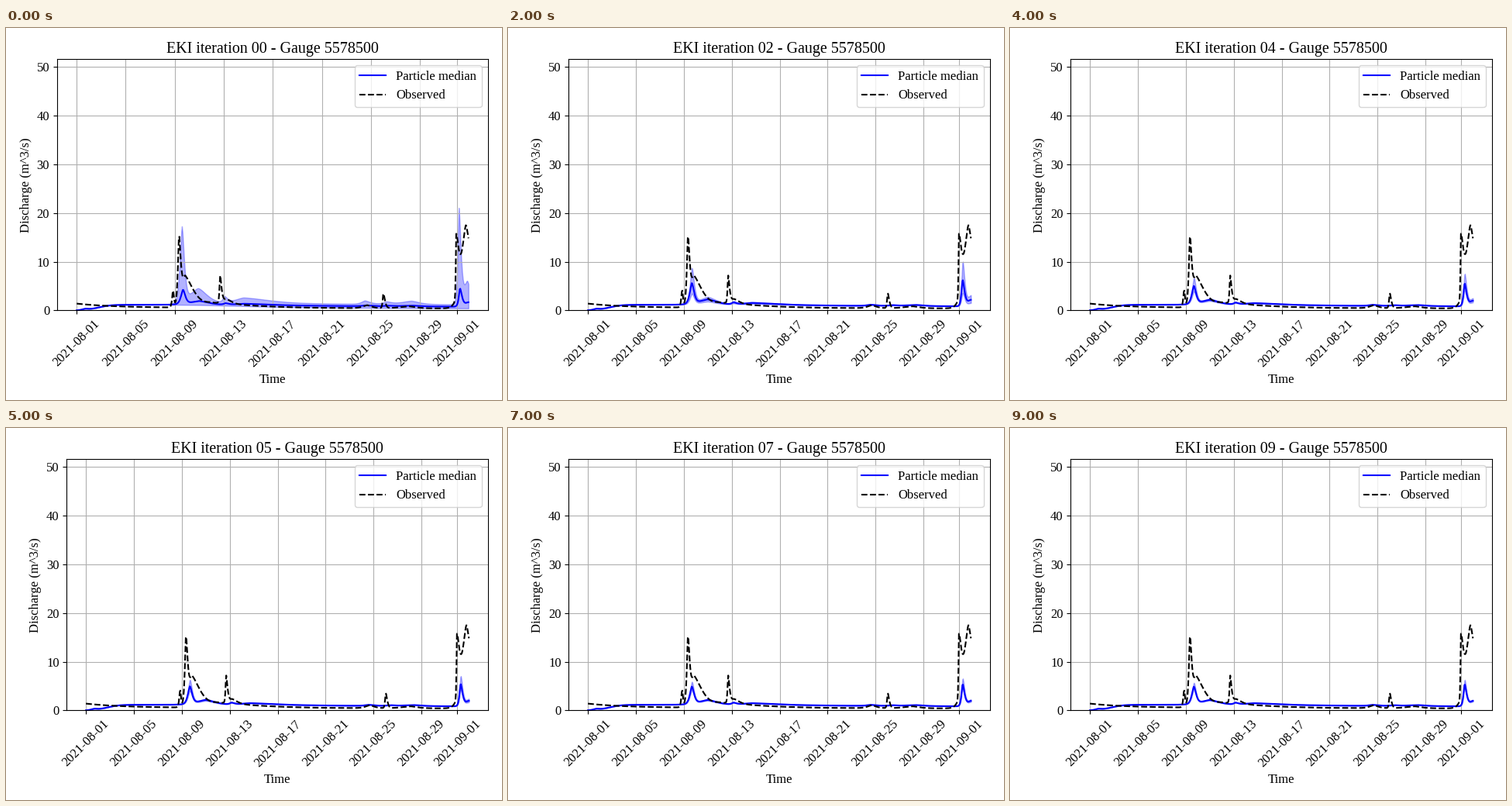
A matplotlib script that plays this animation: 640x480 px, repeating every 10000 ms.

```python
import numpy as np
import matplotlib.pyplot as plt
from matplotlib.animation import FuncAnimation

plt.rcParams["font.family"] = "Liberation Serif"
plt.rcParams["font.size"] = 12

W, H = 640, 480
TOP, BOTTOM, RIGHT = 40.1, 364.4, 622
END = 32 - 1 / 24                      # hourly record, in days since 1 August
DAYS = np.linspace(0, END, 32 * 24)

# Flow pulses: day of the peak, height, rise time, recession time
RAIN = [(7.86, 3.5, 0.1, 0.1), (8.35, 13.4, 0.13, 0.19), (8.85, 6.4, 0.4, 0.95),
        (11, 0.9, 0.9, 4.5), (11.7, 5.55, 0.07, 0.16), (12.2, 1, 0.4, 0.6),
        (23.7, 0.6, 0.5, 0.5), (25.02, 3.1, 0.08, 0.17), (27.1, 0.4, 1, 0.8),
        (30.96, 13.1, 0.05, 0.3), (31.75, 16.9, 0.5, 0.7)]
FLASH = [(8.68, 3.5, 0.24, 0.25), (31.27, 4.45, 0.14, 0.22), (31.95, 1.1, 0.4, 0.4)]
SLOW = [(10, 1, 1.1, 1.1), (12.15, 0.35, 0.2, 0.35), (13.7, 0.4, 1.2, 3),
        (23.6, 0.2, 0.4, 0.6), (25.4, 0.13, 0.4, 0.5), (27.4, 0.2, 1.2, 0.9)]


def flow(pulses, lead=0):
    """Sum of skewed pulses, arriving `lead` days early."""
    total = np.zeros_like(DAYS)
    for day, height, rise, fall in pulses:
        x = DAYS - day + lead
        total += height * np.exp(-np.abs(x / np.where(x < 0, rise, fall)) ** 1.5)
    return total


dry = np.maximum(DAYS - 8, 0)          # days since the model has spun up
soil = (1.16 * (1 - np.exp(-(DAYS / 2) ** 2.5)) - 0.0135 * dry
        + flow([(0.7, 0.28, 0.4, 0.4)]))
drift = 1 - np.exp(-(dry / 7) ** 2)
observed = 0.6 - 0.006 * DAYS + 0.8 * np.exp(-DAYS / 3) + flow(RAIN)


def member(fast, slow, offset=0, lead=0):
    return soil + fast * flow(FLASH, lead) + slow * flow(SLOW, lead) + offset * drift


def ensemble(k):
    """Lower bound, median and upper bound at iteration k."""
    if k == 0:
        return member(0, 0, -0.42), member(0.83, 0.8, -0.08), member(4.35, 3.4, 0.4, 0.1)
    extra, spread = 0.45 ** (k - 1), k ** -0.9
    fast, slow = 1 + 0.45 * extra, 1 + 0.25 * extra
    return (member(fast - 1.1 * spread, slow - 0.8 * spread),
            member(fast, slow),
            member(fast + 1.6 * spread, slow + spread))


fig = plt.figure(figsize=(W / 100, H / 100), dpi=100)
ax = fig.add_subplot()


def draw(k):
    low, mid, high = ensemble(k)
    ax.clear()
    left = 65.9 if k == 0 else 78.4
    ax.set_position([left / W, 1 - BOTTOM / H, (RIGHT - left) / W, (BOTTOM - TOP) / H])
    ax.fill_between(DAYS, low, high, color="blue", alpha=0.3)
    ax.plot(DAYS, mid, color="blue", label="Particle median")
    ax.plot(DAYS, observed, "k--", label="Observed")
    ax.set_xlim(-0.05 * END, 1.05 * END)
    ax.set_ylim(0, 51.6)
    ticks = [*range(0, 29, 4), 31]
    labels = [f"2021-{8 + d // 31:02d}-{d % 31 + 1:02d}" for d in ticks]
    ax.set_xticks(ticks, labels, rotation=45)
    ax.set_yticks(range(0, 51, 10))
    ax.grid(True)
    ax.set_xlabel("Time")
    ax.set_ylabel("Discharge (m^3/s)")
    ax.set_title(f"EKI iteration {k:02d} - Gauge 5578500")
    ax.legend(loc="upper right")
    return []


anim = FuncAnimation(fig, draw, frames=10, interval=1000, repeat=True,
                     repeat_delay=0, init_func=lambda: draw(0))
plt.show()
```
